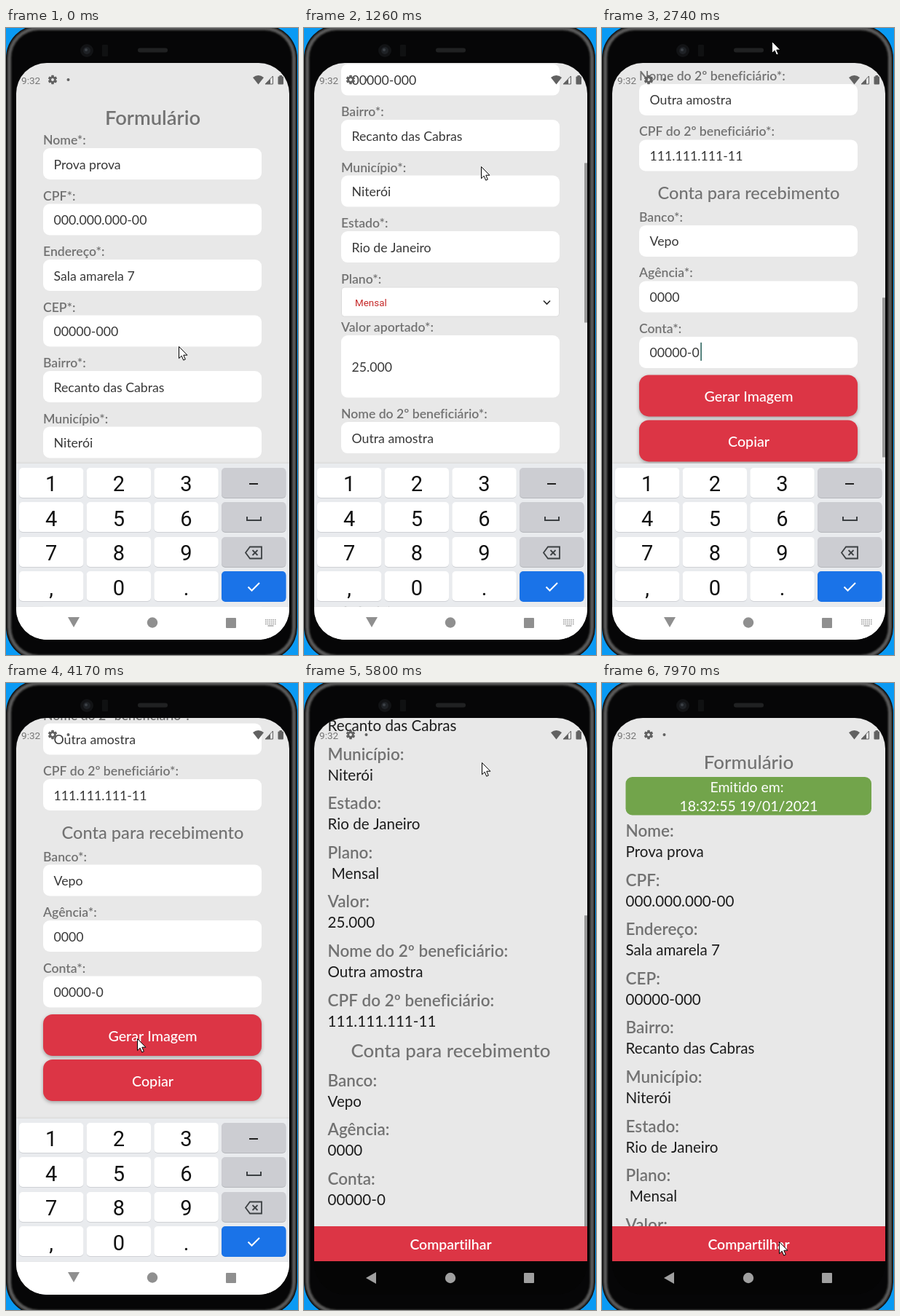
An HTML page with a canvas for the animation above (8000 ms loop, 401 by 861 pixels).

```html
<!DOCTYPE html>
<html lang="pt-BR">
<head>
<meta charset="utf-8">
<title>Formulário</title>
<style>
html, body { margin: 0; width: 100%; height: 100%; overflow: hidden; background: #0a9af4; }
canvas { display: block; width: 401px; height: 861px; }
</style>
</head>
<body>
<canvas id="stage"></canvas>
<script>
const W = 401, H = 861, LOOP = 8000;
const canvas = document.getElementById('stage');
const ctx = canvas.getContext('2d');
const ratio = window.devicePixelRatio || 1;
canvas.width = W * ratio;
canvas.height = H * ratio;

const SANS = 'Lato, "Open Sans", sans-serif';
const ROBOTO = 'Roboto, sans-serif';
const RED = '#dc3545', GREY = '#727272', INK = '#383838';
const LEFT = 14, TOP = 48, WIDTH = 375, HEIGHT = 792;

const out = p => 1 - (1 - p) ** 3;
const inOut = p => p * p * (3 - 2 * p);
const mix = (a, b, p) => a + (b - a) * p;
const clamp = (v, lo = 0, hi = 1) => Math.max(lo, Math.min(hi, v));
const ramp = (t, a, b) => clamp((t - a) / (b - a));

// Pages scroll inside a view; the bar's length follows from view and content.
const page = (view, content, flash) => ({ view, content, flash, max: content - view });
const form = page(550, 1380.5, -LOOP);
const result = page(698, 1141.5, 4540);

// Pointer moves; those with a page drag it and then fling it to rest.
const SLOP = 14, HOLD = 190, CLICK = 3860;
const home = { x: 237, y: 437 };
const moves = [
  { from: 80, to: 280, x: 243, y: 508 },
  { from: 805, to: 1165, x: 243, y: 190, page: form, rest: 381, fling: 430 },
  { from: 1300, to: 1800, x: 230, y: 460 },
  { from: 2250, to: 2752, x: 233, y: 8, page: form, rest: form.max, fling: 150 },
  { from: 2850, to: 3100, x: 180, y: 488 },
  { from: 4700, to: 5250, x: 244, y: 456 },
  { from: 5450, to: 5720, x: 244, y: 109, page: result, rest: result.max, fling: 75 },
  { from: 6000, to: 6500, x: 244, y: 250 },
  { from: 6780, to: 7350, x: 244, y: 836, page: result, rest: 0, fling: 0.1 },
  { from: 7450, to: 7850, x: 243, y: 767 }
];
const drags = moves.filter(m => m.page);

function pointer(t) {
  let { x, y } = home;
  for (const m of moves) {
    if (t < m.from) break;
    const p = ramp(t, m.from, m.to), e = m.page ? p : inOut(p);
    x = mix(x, m.x, e);
    y = mix(y, m.y, e);
  }
  return { x, y };
}

function scrollAt(pg, t) {
  let pos = 0;
  for (const d of drags) {
    if (d.page !== pg || t < d.from) continue;
    const dy = pointer(d.from).y - pointer(Math.min(t, d.to)).y;
    const pulled = Math.sign(dy) * Math.max(0, Math.abs(dy) - SLOP);
    pos = mix(clamp(pos + pulled, 0, pg.max), d.rest, out(ramp(t, d.to, d.to + d.fling)));
  }
  return pos;
}

function barAlpha(pg, t) {
  const fadeAfter = end => 1 - ramp(t, end + 300, end + 550);
  let alpha = t < pg.flash ? 0 : fadeAfter(pg.flash + 160);
  for (const d of drags)
    if (d.page === pg && t >= d.from) alpha = fadeAfter(d.to + d.fling);
  return alpha;
}

// Drawing helpers
function rect(x, y, w, h, fill) {
  ctx.fillStyle = fill;
  ctx.fillRect(x, y, w, h);
}

function box(x, y, w, h, r, fill) {
  ctx.beginPath();
  ctx.roundRect(x, y, w, h, r);
  if (fill) { ctx.fillStyle = fill; ctx.fill(); }
}

function text(str, x, y, size, color, weight = 400, align = 'left', family = SANS) {
  ctx.font = `${weight} ${size}px ${family}`;
  ctx.letterSpacing = '0.01px'; // keeps letters unjoined
  ctx.textAlign = align;
  ctx.fillStyle = color;
  ctx.fillText(str, x, y);
}

const centred = (str, y, size, color, weight) => text(str, 201.5, y, size, color, weight, 'center');

function poly(points, fill) {
  ctx.beginPath();
  points.forEach(([x, y]) => ctx.lineTo(x, y));
  ctx.closePath();
  if (fill) { ctx.fillStyle = fill; ctx.fill(); }
}

function stroke(color, width) {
  ctx.strokeStyle = color;
  ctx.lineWidth = width;
  ctx.stroke();
}

function line(points, color, width) {
  ctx.beginPath();
  points.forEach(([x, y]) => ctx.lineTo(x, y));
  stroke(color, width);
}

function disc(x, y, r, fill) {
  ctx.beginPath();
  ctx.arc(x, y, r, 0, Math.PI * 2);
  ctx.fillStyle = fill;
  ctx.fill();
}

function shadowed(color, blur, dy, draw) {
  ctx.save();
  ctx.shadowColor = color;
  ctx.shadowBlur = blur * ratio;
  ctx.shadowOffsetY = dy * ratio;
  draw();
  ctx.restore();
}

function clipped(y, h, draw) {
  ctx.save();
  ctx.beginPath();
  ctx.rect(LEFT, y, WIDTH, h);
  ctx.clip();
  draw();
  ctx.restore();
}

function drawPhone() {
  rect(0, 0, W, H, '#0a9af4');
  // The metal rim shades from dark to grey and back to black.
  for (let i = 0; i < 9; i++) {
    const shade = 8 + 82 * Math.sin(Math.PI * (i + 1) / 10) ** 2;
    box(i, i - 4, W - 1 - 2 * i, 872 - 2 * i, 45 - i, `rgb(${shade},${shade},${shade})`);
  }
  box(9, 5, W - 19, 854, 36, '#060607');
  disc(111, 31, 9, '#121315');
  disc(111, 31, 5, '#1f2226');
  disc(110, 30, 2, '#3c4046');
  box(132, 23, 8, 16, 1, '#101112');
  box(181, 27.5, 41, 6, 3, '#202122');
}

function drawStatus() {
  const tone = '#616161';
  text('9:32', 21, 76.5, 13.6, '#757575', 400, 'left', ROBOTO);
  ctx.save();
  ctx.translate(64, 71);
  for (let i = 0; i < 6; i++) {
    ctx.rotate(Math.PI / 3);
    box(-1.8, -6.2, 3.6, 4, 0.6, tone);
  }
  ctx.beginPath();
  ctx.arc(0, 0, 3.3, 0, Math.PI * 2);
  stroke(tone, 2.6);
  ctx.restore();
  disc(85.5, 71, 2, tone);
  ctx.beginPath();
  ctx.moveTo(346.5, 77.5);
  ctx.lineTo(339, 68);
  ctx.quadraticCurveTo(346.5, 62, 354, 68);
  ctx.fillStyle = tone;
  ctx.fill();
  poly([[356, 77], [366.5, 77], [366.5, 66]]);
  stroke(tone, 1);
  poly([[356, 77], [363, 77], [363, 70]], tone);
  box(373.5, 66.5, 7.5, 11, 1, tone);
  rect(375.5, 65, 3.5, 2, tone);
}

function drawOverlay(pg, scroll, t) {
  const k = pg.view / pg.content;
  rect(385, TOP + scroll * k, 4, pg.view * k, `rgba(110,110,110,${0.65 * barAlpha(pg, t)})`);
  drawStatus();
}

// Content shared by both pages
const personal = [
  ['Nome', 'Prova prova'], ['CPF', '000.000.000-00'], ['Endereço', 'Sala amarela 7'],
  ['CEP', '00000-000'], ['Bairro', 'Recanto das Cabras'], ['Município', 'Niterói'],
  ['Estado', 'Rio de Janeiro']
];
const second = [['Nome do 2º beneficiário', 'Outra amostra'], ['CPF do 2º beneficiário', '111.111.111-11']];
const account = [['Banco', 'Vepo'], ['Agência', '0000'], ['Conta', '00000-0']];
const ACCOUNT_TITLE = 'Conta para recebimento';

// Form page
const formLabel = (str, top) => text(str + '*:', 51, top - 5, 17.6, GREY, 600);

function drawField([label, value], top, height = 43) {
  formLabel(label, top);
  box(51, top, 300, height, 9, '#fff');
  text(value, 65.5, top + height / 2 + 7, 17.7, INK);
  return top + height + 33.5;
}

function drawSelect(label, value, top) {
  formLabel(label, top);
  box(51.5, top + 0.5, 299, 40, 4, '#fff');
  stroke('#dcdcdc', 1);
  text(value, 70, top + 26, 13.4, '#c62828', 400, 'left', ROBOTO);
  line([[329, top + 19], [333.5, top + 23.5], [338, top + 19]], '#222', 1.5);
  return top + 66.5;
}

function drawButton(label, top) {
  shadowed('rgba(0,0,0,.3)', 5, 2, () => box(51, top, 300, 57, 13, RED));
  centred(label, top + 37, 19.7, '#fff', 500);
  return top + 62;
}

function drawForm(t) {
  const scroll = scrollAt(form, t);
  rect(LEFT, TOP, WIDTH, HEIGHT, '#e8e8e8');
  ctx.save();
  ctx.translate(0, -scroll);
  centred('Formulário', 133, 27.4, GREY, 600);
  let y = 165;
  for (const f of personal) y = drawField(f, y);
  y = drawSelect('Plano', 'Mensal', y);
  y = drawField(['Valor aportado', '25.000'], y, 85.5);
  for (const f of second) y = drawField(f, y);
  centred(ACCOUNT_TITLE, y + 5.5, 23.6, GREY, 500);
  y += 41;
  for (const f of account) y = drawField(f, y);
  if (Math.floor((t - 40) / 500) % 2) rect(135.3, y - 68.5, 1.6, 25, '#2f6660');
  y = drawButton('Gerar Imagem', y - 24);
  drawButton('Copiar', y);
  ctx.restore();
  drawOverlay(form, scroll, t);
}

// Keyboard and navigation
function drawKeys() {
  rect(LEFT, 598, WIDTH, 197, '#e9ebee');
  ['123', '456', '789', ',0.'].forEach((chars, row) => {
    const y = Math.floor(604 + 47.5 * row), base = Math.round(636 + 47.5 * row);
    for (let col = 0; col < 4; col++) {
      const x = 18 + 92.7 * col;
      const [fill, edge] = col < 3 ? ['#fff', '#cfd1d5'] : row < 3 ? ['#cccdd2', '#b5b7bc'] : ['#1a73e8', '#1a73e8'];
      box(x, y + 1, 88.3, 41, 5, edge);
      box(x, y, 88.3, 41, 5, fill);
      if (col < 3) text(chars[col], x + 44.1, base, 29, '#111', 400, 'center', ROBOTO);
    }
  });
  const tone = '#3c4043';
  line([[334, 626], [346, 626]], '#222', 2.2);
  line([[331, 671], [331, 676], [350, 676], [350, 671]], tone, 2);
  poly([[329, 720.5], [335, 712.5], [351, 712.5], [351, 728.5], [335, 728.5]]);
  stroke(tone, 1.8);
  for (const s of [-1, 1]) line([[338.5, 720.5 - 3.5 * s], [345.5, 720.5 + 3.5 * s]], tone, 1.8);
  line([[332.5, 767.5], [337.5, 772.5], [348, 762]], '#fff', 2);
}

function drawNav(back, tone, y) {
  poly(back, tone);
  disc(201, y, 7.2, tone);
  box(302, 810, 14, 14, 1, tone);
}

function drawKeyboard(t) {
  clipped(590, 204.5, () => {
    ctx.translate(0, 200 * inOut(ramp(t, 4220, 4420)));
    shadowed('rgba(0,0,0,.15)', 3, 0, () => rect(LEFT, 598, WIDTH, 197, '#e9ebee'));
    drawKeys();
  });
  rect(LEFT, 795, WIDTH, 45, '#fff');
  drawNav([[85, 809], [101, 809], [93, 823]], '#8f8f8f', 816.5);
  if (t > 4130) return;
  for (let i = 0; i < 18; i++)
    rect(356 + (i % 6) * 2.6, 812 + Math.floor(i / 6) * 2.8, 1.6, 1.6, '#a0a0a0');
  rect(359.5, 820.2, 8, 1.4, '#a0a0a0');
}

// Result page
function drawDetail([label, value], y) {
  text(label + ':', 32.5, y, 22.5, GREY, 600);
  text(value, 32.5, y + 28, 20.6, '#1c1c1c');
  return y + 67.6;
}

function drawResult(t) {
  const scroll = scrollAt(result, t);
  rect(LEFT, TOP, WIDTH, 700, '#e8e8e8');
  clipped(TOP, result.view, () => {
    ctx.translate(0, -scroll);
    centred('Formulário', 117.5, 25.9, GREY, 500);
    box(32.5, 129, 337.5, 52.5, 9, '#72a44b');
    text('Emitido em:', 199, 150, 19.4, '#fff', 400, 'center');
    centred('18:32:55 19/01/2021', 176, 19.4, '#fff');
    let y = 211;
    for (const d of [...personal, ['Plano', ' Mensal'], ['Valor', '25.000'], ...second]) y = drawDetail(d, y);
    centred(ACCOUNT_TITLE, y + 2.4, 25.9, GREY, 500);
    y += 42.7;
    for (const d of account) y = drawDetail(d, y);
  });
  drawOverlay(result, scroll, t);
  rect(LEFT, 746, WIDTH, 48, RED);
  centred('Compartilhar', 778, 19.4, '#fff', 600);
  rect(LEFT, 794, WIDTH, 46, '#050505');
  drawNav([[85, 817], [99, 809], [99, 825]], '#a0a0a0', 817);
}

function drawPointer(t) {
  const { x, y } = pointer(t);
  const pressed = drags.some(d => t >= d.from - HOLD && t < d.to - 20) || (t >= CLICK && t < CLICK + 130);
  if (pressed) disc(x, y - 0.5, 12, 'rgba(255,250,0,.5)');
  ctx.save();
  ctx.translate(x + 0.5, y + 0.5);
  poly([[0, 0], [0, 16.2], [3.7, 12.7], [6.2, 18.6], [8.8, 17.5], [6.3, 11.7], [11.4, 11.7]], '#fff');
  stroke('#000', 1);
  ctx.restore();
}

function draw(t) {
  ctx.setTransform(ratio, 0, 0, ratio, 0, 0);
  drawPhone();
  ctx.save();
  box(LEFT, TOP, WIDTH, HEIGHT, 42);
  ctx.clip();
  const fade = ramp(t, 4300, 4540);
  if (fade < 1) {
    drawForm(t);
    drawKeyboard(t);
  }
  if (fade > 0) {
    ctx.globalAlpha = fade;
    drawResult(t);
  }
  ctx.restore();
  drawPointer(t);
}

const start = performance.now();
function tick() {
  draw((performance.now() - start) % LOOP);
  requestAnimationFrame(tick);
}
tick();
</script>
</body>
</html>
```
